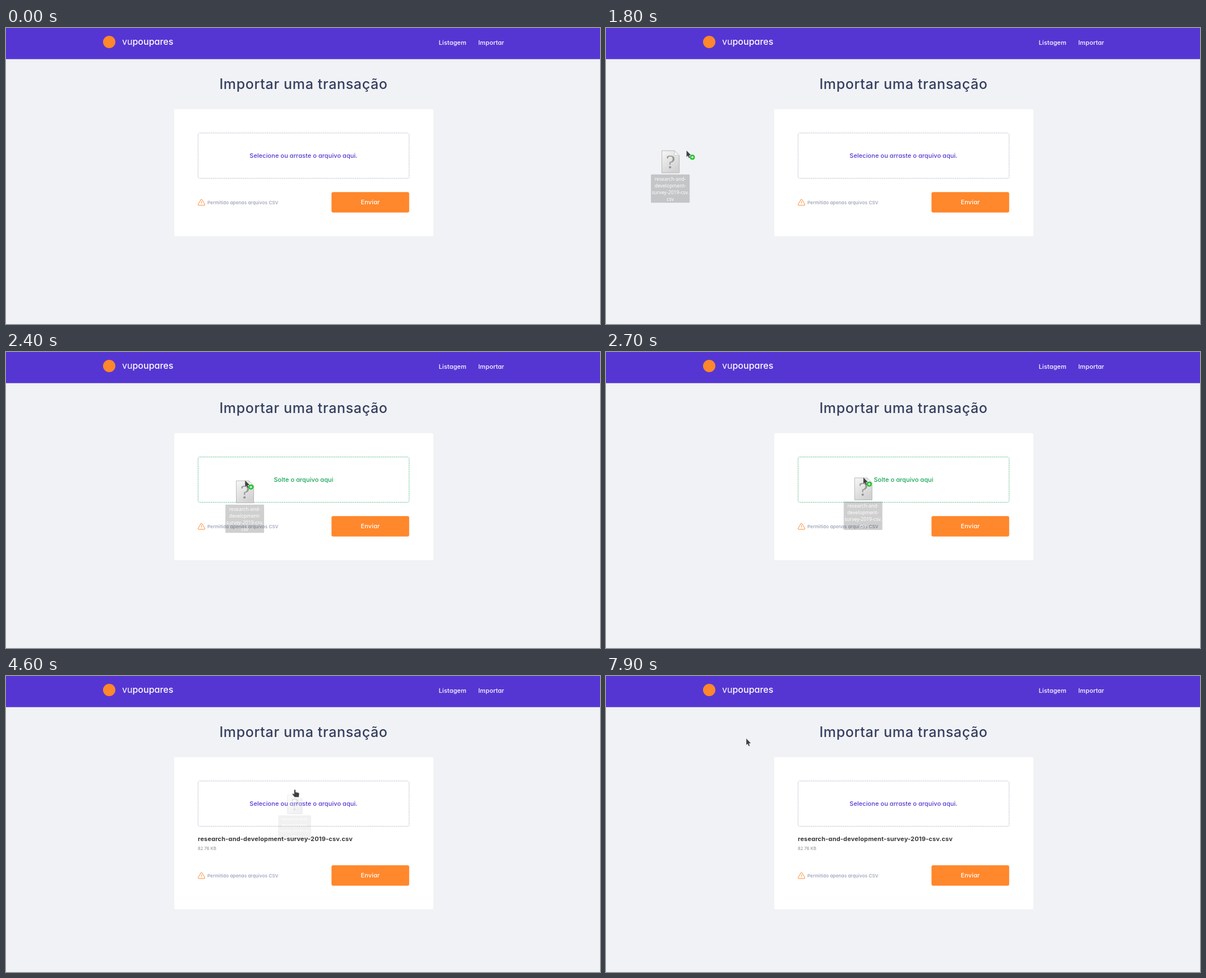
An HTML page for the animation above (8000 ms loop, 1059 by 529 pixels).

```html
<!DOCTYPE html>
<html lang="pt-BR">
<head>
<meta charset="utf-8">
<title>Importar uma transação</title>
<style>
  html, body { margin: 0; width: 100%; height: 100%; overflow: hidden; background: #f0f2f5; }
  #stage {
    position: absolute; left: 0; top: 0; width: 1059px; height: 529px; overflow: hidden;
    font: 500 11px/20px Inter, sans-serif;
    font-feature-settings: "cv11";
    letter-spacing: .01em; white-space: nowrap;
  }
  #stage > *, #foot > * { position: absolute; }
  #stage svg { left: 0; top: 0; overflow: visible; }
  header {
    left: 0; top: 0; width: 100%; height: 55px;
    border-bottom: 1px solid #8d79dd; background: #5636d3; color: #fff;
  }
  header * { position: absolute; }
  .mark { left: 173px; top: 14px; width: 22px; height: 22px; border-radius: 50%; background: #ff872c; }
  .brand { left: 207px; top: 14px; font-size: 16px; letter-spacing: 0; }
  .brand * { position: static; }
  .brand i { font-style: normal; font-weight: 400; }
  nav a { top: 16px; }
  h1 {
    left: 299.5px; top: 80px; width: 462px; margin: 0; text-align: center;
    font: 500 25px/40px Inter, sans-serif; letter-spacing: .026em; color: #363f5f;
  }
  #card { left: 299.5px; top: 145px; width: 462px; height: 227px; border-radius: 3px; background: #fff; }
  #zone { color: #5636d3; stroke: #969cb3; }
  #zone.over { color: #12a454; stroke: #12a454; }
  #zone rect { fill: none; stroke-width: .7; stroke-dasharray: 2 1.33; }
  #zone text { fill: currentColor; stroke: none; text-anchor: middle; letter-spacing: .005em; }
  #file { left: 342px; top: 280.5px; color: #3a3a3a; }
  #file b { display: block; font-weight: 700; letter-spacing: .015em; }
  #file span { display: block; margin-top: -2px; font-size: 7.5px; font-weight: 400; color: #888; }
  #foot { left: 0; top: 0; }
  .note { left: 359px; top: 301.5px; font-size: 8.15px; color: #969cb3; }
  .send { left: 580px; top: 293px; width: 139px; color: #fff; text-align: center; line-height: 37px; }
</style>
</head>
<body>
<div id="stage">
  <header>
    <div class="mark"></div>
    <div class="brand"><i>vu</i><span>poupares</span></div>
    <nav><a style="left:771.5px">Listagem</a><a style="left:842px">Importar</a></nav>
  </header>
  <h1>Importar uma transação</h1>
  <div id="card"></div>
  <svg id="zone" width="1" height="1">
    <rect x="342.4" y="187.6" width="376.3" height="81" rx="3"/>
    <text id="hint" x="530.5" y="232"></text>
  </svg>
  <div id="file"><b>research-and-development-survey-2019-csv.csv</b><span>82.76 KB</span></div>
  <div id="foot">
    <svg width="1" height="1" fill="none" stroke="#ff872c" stroke-linecap="round" stroke-linejoin="round">
      <path d="M347.4 306.9 342.7 315Q342 317 343.8 317H353.2Q355 317 354.3 315L349.6 306.9Q348.5 305.5 347.4 306.9Z"/>
      <path d="M348.5 310v2.4M348.5 314.4v.1"/>
      <rect x="580.3" y="293.3" width="138.5" height="36.4" rx="3" fill="#ff872c" stroke="none"/>
    </svg>
    <div class="note">Permitido apenas arquivos CSV</div>
    <div class="send">Enviar</div>
  </div>

  <svg width="1059" height="529">
    <defs>
      <linearGradient id="paper" x2=".6" y2="1">
        <stop stop-color="#f6f6f6"/><stop offset="1" stop-color="#d2d2d2"/>
      </linearGradient>
    </defs>
    <g id="ghost">
      <path d="M-15.5 1H7L15.5 10V40.5H-15.5Z" fill="url(#paper)" stroke="#a9a9a9" stroke-width=".8"/>
      <path d="M7 1Q8.5 6 6 9.5 11 8.5 15.5 10Z" fill="#fafafa" stroke="#b8b8b8" stroke-width=".6"/>
      <text y="33" text-anchor="middle" fill="#969696" font-family="DejaVu Serif, serif" font-weight="400" font-size="32">?</text>
      <rect x="-35" y="43.5" width="69" height="50.5" rx="1" fill="#000" fill-opacity=".19"/>
      <g id="label" fill="#fff" text-anchor="middle" font-family="Noto Sans, sans-serif" font-weight="400" font-size="8.6" letter-spacing="0"></g>
    </g>
    <g id="cursor">
      <g fill="#404040" stroke="#fff" stroke-opacity=".5" stroke-width=".6">
        <path id="arrow" d="M0 0V12L2.6 9.8 4.4 13.9 6.5 13 4.8 9.2 8.3 8.6Z"/>
        <path id="hand" d="M-1.3 1.2Q-1.2 0 0 0T1.3 1.2V4.6L6.2 5.6Q7.8 6 7.8 7.6L7 13.6H-.4L-4.6 8.3Q-4.4 6.8-3 7.2L-1.3 8.2Z"/>
      </g>
      <g id="badge">
        <circle cx="10.6" cy="12.2" r="4.6" fill="#1bc42c"/>
        <path d="M8.2 12.2h4.8M10.6 9.8v4.8" stroke="#fff" stroke-width="1.2"/>
      </g>
    </g>
  </svg>
</div>
<script>
  const LOOP = 8000;
  const APPEAR = 1300, DRAG = 1400, ENTER = 2300, RELEASE = 4400, DROP = 4600, GONE = 4800, LEAVE = 6300;

  // Each leg leads from the end of the one before; a leg of one step is a pause and a jump.
  const origin = { x: -4, y: 222 };
  const legs = [
    { at: APPEAR, end: 2100, steps: 8, x: 219.3, y: 222.6, powX: 1.1, bow: -4 },
    { at: 2100, end: 2800, steps: 7, x: 459, y: 220, powX: 3.55, powY: 3.55, bow: 9 },
    { at: 2800, end: 3500, x: 515, y: 203 },
    { at: 3500, end: 5400, x: 512, y: 201 },
    { at: 5400, end: 5600, x: 504, y: 201 },
    { at: 5600, end: 6000, x: 496, y: 185.6 },
    { at: 6000, end: LEAVE, x: 492, y: 177 },
    { at: LEAVE, end: 7900, steps: 8, x: 250, y: 111.5, powX: 1.25, powY: 5 }
  ];

  const $ = id => document.getElementById(id);
  const show = (id, on) => { $(id).style.display = on ? '' : 'none'; };
  const during = (t, a, b) => t >= a && t < b;
  const easeOut = (a, b, u, pow) => a + (b - a) * (1 - (1 - u) ** pow);

  function pointer(t) {
    let { x, y } = origin;
    for (const { at, end, steps = 1, x: toX, y: toY, powX = 1, powY = 1, bow = 0 } of legs) {
      if (t < at) break;
      const u = Math.min(1, Math.floor((t - at) * steps / (end - at)) / steps);
      x = easeOut(x, toX, u, powX);
      y = easeOut(y, toY, u, powY) + bow * Math.sin(Math.PI * u);
    }
    return { x, y };
  }

  $('label').innerHTML = ['research-and-', 'development-', 'survey-2019-csv.', 'csv']
    .map((s, i) => `<text x="-.5" y="${54.5 + 12 * i}">${s}</text>`).join('');

  function draw(t) {
    const over = during(t, ENTER, DROP), done = t >= DROP;
    const hand = during(t, RELEASE, LEAVE);

    $('zone').classList.toggle('over', over);
    $('hint').textContent = over ? 'Solte o arquivo aqui' : 'Selecione ou arraste o arquivo aqui.';
    $('card').style.height = (done ? 272 : 227) + 'px';
    $('foot').style.top = (done ? 45 : 0) + 'px';
    show('file', done);

    show('cursor', t >= APPEAR);
    show('arrow', !hand);
    show('hand', hand);
    show('badge', during(t, DRAG, RELEASE));
    show('ghost', during(t, DRAG, GONE));

    const tip = pointer(t);
    $('cursor').setAttribute('transform', `translate(${tip.x} ${tip.y})`);

    // the file trails the pointer until it is over the zone, then shrinks and fades once dropped
    const file = t < ENTER ? pointer(t - 100) : tip;
    const shrink = done ? ' translate(0 49) scale(.85) translate(0 -47)' : '';
    $('ghost').setAttribute('transform', `translate(${file.x} ${file.y})${shrink}`);
    $('ghost').setAttribute('opacity', done ? .3 : 1);
  }

  const start = performance.now();
  function tick() {
    draw((performance.now() - start) % LOOP);
    requestAnimationFrame(tick);
  }
  tick();
</script>
</body>
</html>
```
